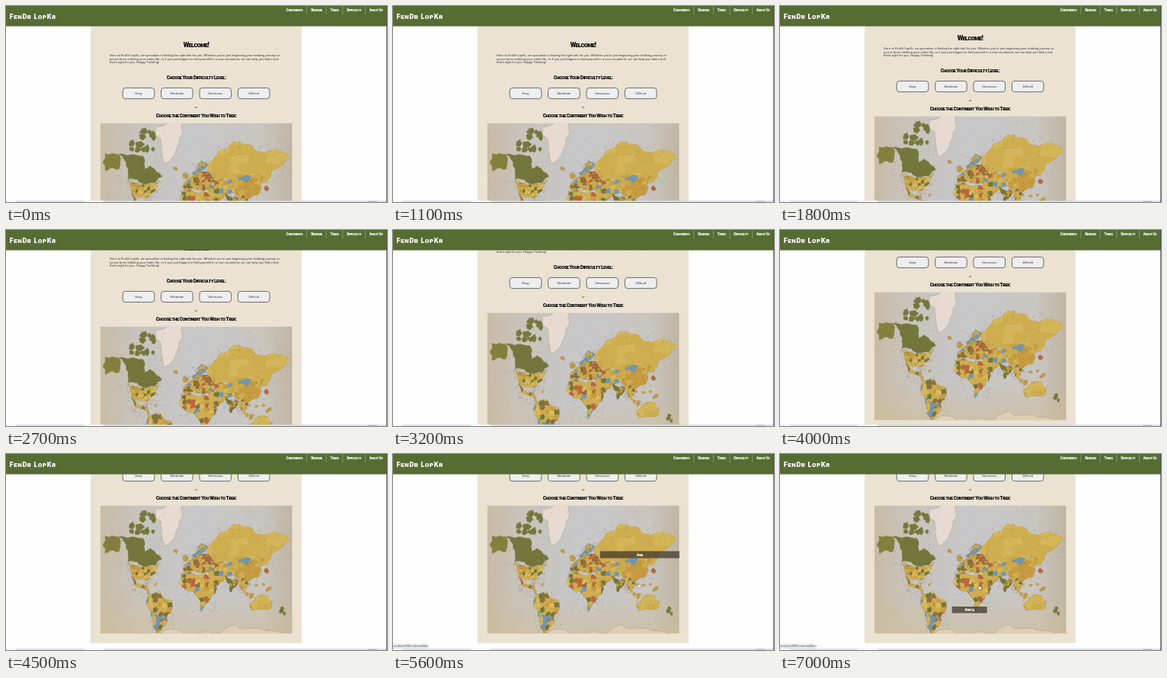
An HTML page for the animation above (7.1 s loop, 500 by 257 pixels).

```html
<!DOCTYPE html>
<html lang="en">
<head>
<meta charset="utf-8">
<style>
  html, body { margin: 0; width: 100%; height: 100%; overflow: hidden; background: #fefefe; }
  svg { display: block; width: 100vw; height: 100vh; }
  text { font: 4.16px "Liberation Sans", Arial, sans-serif; fill: #333; }
  .mid { text-anchor: middle; }
  .display { font-family: Roboto, sans-serif; font-weight: 900; font-variant: small-caps; letter-spacing: -.07em; fill: #0b0b0b; }
  .welcome { font-size: 8.6px; }
  .head { font-size: 6.4px; }
  .small { font-size: 4.6px; fill: #fff; }
  .logo { font-size: 9px; letter-spacing: .65px; fill: #fff; }
  .status { font-size: 3.35px; fill: #555; }
</style>
</head>
<body>
<svg viewBox="0 0 500 257">
  <defs>
    <linearGradient id="sea">
      <stop offset="0" stop-color="#c8bca6"/>
      <stop offset=".2" stop-color="#c8c4bd"/>
      <stop offset=".5" stop-color="#c7c7c9"/>
      <stop offset=".85" stop-color="#c9c5bf"/>
      <stop offset="1" stop-color="#bfb5a2"/>
    </linearGradient>
    <linearGradient id="fade" x2="0" y2="1">
      <stop offset=".7" stop-color="#d2bd95" stop-opacity="0"/>
      <stop offset="1" stop-color="#d2bd95" stop-opacity=".55"/>
    </linearGradient>
    <clipPath id="frame"><rect width="252" height="168"/></clipPath>
  </defs>

  <g id="page">
    <rect x="111" y="-10" width="277" height="344" fill="#ebe2d2"/>
    <text class="mid display welcome" x="249.5" y="53.5">Welcome!</text>
    <text x="136" y="65.6">Here at FenDr LopKr, we specialize in finding the right trek for you. Whether you're just beginning your trekking journey or</text>
    <text x="136" y="70.5">you've been trekking your entire life, or if you just happen to find yourself in a new countinent, we can help you find a trek</text>
    <text x="136" y="75.4">that's right for you. Happy Trekking!</text>
    <text class="mid display head" x="249.7" y="96">Choose Your Difficulty Level:</text>
    <g id="buttons"></g>
    <text class="mid" x="249.7" y="133.6">or</text>
    <text class="mid display head" x="249.7" y="146">Choose the Continent You Wish to Trek:</text>
    <g transform="translate(123.7 153.5)" clip-path="url(#frame)">
      <rect width="252" height="168" fill="url(#sea)"/>
      <rect width="252" height="168" fill="url(#fade)"/>
      <g id="map"></g>
    </g>
  </g>

  <rect width="500" height="26.6" fill="#566c33"/>
  <text class="display logo" x="4.8" y="16.8">FenDr LopKr</text>
  <g id="nav"></g>

  <g id="hover">
    <rect id="band" fill="#443c2c" fill-opacity=".76"/>
    <text id="label" class="mid display small"></text>
    <rect x="-1" y="249.3" width="47" height="5.9" rx="1" fill="#e9eaec" stroke="#ccc" stroke-width=".3"/>
    <text id="status" class="status" x=".8" y="253.4"></text>
  </g>
  <path id="cursor" d="M-1.2 -2.6q.6-.7 1.1 0v1.8l2 .5q.6.3.4 1l-.5 2h-2.6l-1.7-2.2q.2-.8 1.3-.2z"
        fill="#fff" stroke="#333" stroke-width=".35"/>

  <rect y="255.3" width="500" height="1.7" fill="#d3dce9"/>
  <path d="M0 255.3h13v1.7h-13zM102 255.3h26v1.7h-26z" fill="#f8fafc"/>
  <path d="M476 256.2h12" stroke="#777" stroke-width=".6" stroke-dasharray="2 .7"/>
  <rect x="499.2" width=".8" height="257" fill="#4a4a4a"/>
</svg>

<script>
const $ = id => document.getElementById(id);
const add = (parent, markup) => parent.insertAdjacentHTML('beforeend', markup);

let seed = 11;
const random = () => (seed = seed * 16807 % 2147483647) / 2147483647;
const between = (a, b) => a + random() * (b - a);
const pick = list => list[Math.floor(random() * list.length)];

['Easy', 'Moderate', 'Strenuous', 'Difficult'].forEach((name, i) => {
  const x = 153.2 + i * 50.4;
  add($('buttons'), `<rect x="${x}" y="107.4" width="41.6" height="14.2" rx="3.6" fill="#eeeef0" stroke="#4c4c55" stroke-width=".8"/>
    <text class="mid" x="${x + 20.8}" y="115.6">${name}</text>`);
});

// Menu items are laid out from the right, with a divider between neighbours
let edge = 494.5;
for (const name of ['About Us', 'Difficulty', 'Treks', 'Regions', 'Continents']) {
  if (edge < 494) add($('nav'), `<path d="M${edge + 5.3} 0v11" stroke="#a4b08c" stroke-width=".6"/>`);
  add($('nav'), `<text class="display small" y="7.3">${name}</text>`);
  const item = $('nav').lastElementChild;
  edge -= item.getComputedTextLength();
  item.setAttribute('x', edge);
  edge -= 10.6;
}

// Midpoint displacement turns a few corners into a ragged coast
function coast(points, depth = 3) {
  if (!depth) return 'M' + points.map(p => p.map(v => v.toFixed(1)).join(' ')).join('L') + 'z';
  return coast(points.flatMap(([x, y], i) => {
    const [u, v] = points[(i + 1) % points.length], k = between(-.16, .16);
    return [[x, y], [(x + u) / 2 + (v - y) * k, (y + v) / 2 - (u - x) * k]];
  }), depth - 1);
}

const blob = (x, y, r) => coast([0, 1, 2, 3, 4].map(i => {
  const angle = i * Math.PI * .4, d = r * between(.6, 1.2);
  return [x + d * Math.cos(angle), y + d * Math.sin(angle)];
}), 1);

function specks(count, left, top, right, bottom, length, color) {
  let d = '';
  while (count-- > 0) d += `M${between(left, right).toFixed(1)} ${between(top, bottom).toFixed(1)}h${between(.3, length).toFixed(1)}`;
  add($('map'), `<path d="${d}" stroke="${color}" stroke-width=".42" opacity=".75"/>`);
}

const olive = '#74773b', yellow = '#cfae50', gold = '#c79c42', blue = '#6f97b5', pale = '#e7dbd1';
const mixed = [yellow, yellow, gold, '#d9bd62', blue, olive, '#b9673d', '#8e7040'];
const plains = [yellow, yellow, '#d4b65a'];

// Fills an outline with country patches, then sprinkles place names around it
function land(outline, tints, names = 0, cell = 5) {
  const points = outline.split(' ').map(p => p.split(',').map(Number));
  const xs = points.map(p => p[0]), ys = points.map(p => p[1]);
  const left = Math.min(...xs), right = Math.max(...xs), top = Math.min(...ys), bottom = Math.max(...ys);
  const id = 'land' + $('map').children.length, shape = coast(points);
  let patches = '';
  if (tints.length > 1)
    for (let x = left; x <= right; x += cell)
      for (let y = top; y <= bottom; y += cell)
        patches += `<path d="${blob(x + between(-1, 1), y + between(-1, 1), cell * .75)}" fill="${pick(tints)}"/>`;
  add($('map'), `<g><clipPath id="${id}"><path d="${shape}"/></clipPath>
    <path d="${shape}" fill="${tints[0]}" stroke="#8d815e" stroke-width=".3"/>
    <g clip-path="url(#${id})">${patches}</g></g>`);
  specks(names, left - 2, top, right + 2, bottom, 1.4, '#493b29');
  specks(names / 3, left, top, right, bottom, 1.4, '#a4533a');
}

function islands(count, left, top, right, bottom, size, color) {
  let d = '';
  while (count--) d += blob(between(left, right), between(top, bottom), size * between(.5, 1.2));
  add($('map'), `<path d="${d}" fill="${color}" stroke="#8d815e" stroke-width=".2"/>`);
}

specks(80, 2, 4, 248, 160, 4, '#98948d');
land('6,40 24,41 25,60 6,62', ['#85803c'], 12);
land('24,41 56,43 58,60 66,56 81,70 60,80 36,74', [olive], 30);
islands(9, 34, 24, 74, 38, 5, olive);
islands(7, 54, 9, 74, 24, 5, olive);
land('36,74 60,80 78,75 62,98 42,93', [yellow, gold, olive, '#d9bd62'], 110, 4);
land('41,92 50,103 60,105 66,118 47,107', mixed, 70, 4);
islands(5, 60, 100, 76, 109, 1.5, gold);
land('64,116 78,113 95,127 88,144 74,168 69,150 61,128', [yellow, yellow, ...mixed], 60, 6);
land('70,142 82,146 74,167', [blue], 10);
land('71,5 108,-2 103,27 83,53 80,22', [pale], 8);
islands(2, 97, 59, 102, 62, 2.5, gold);
land('106,90 118,87 140,91 152,105 145,122 132,140 122,113 104,103', mixed, 90, 6);
land('141,86 150,74 178,72 182,90 155,105', [yellow, ...mixed], 70, 6);
land('140,54 176,24 205,37 249,45 226,62 218,78 190,72 148,75', plains, 90, 12);
land('172,74 214,70 208,93 196,99 176,92', [gold, yellow, gold], 60, 7);
land('180,73 198,70 194,80', [blue], 8);
land('108,87 122,69 142,64 150,80 130,88', mixed, 140, 4);
land('120,66 132,50 141,54 128,69', [blue, gold, blue, yellow], 30, 4);
islands(3, 111, 64, 115, 72, 3, gold);
land('163,92 183,97 171,114', [olive, olive, gold], 35, 4);
land('180,97 194,97 190,116', mixed, 50, 4);
islands(14, 186, 102, 224, 124, 3, gold);
islands(4, 212, 76, 222, 88, 2.5, '#b9673d');
land('195,130 210,117 220,118 225,134 212,136 198,137', plains, 25, 8);
islands(3, 235, 134, 242, 142, 3, olive);
land('60,170 85,163 150,168 205,161 240,170', ['#ddcfb4'], 6);

const scrollKeys = [[1500, 0], [1800, 9], [2700, 27], [3200, 45], [4000, 72], [4500, 86]];
const cursorKeys = [[4700, 444, 125], [5200, 340, 160], [5600, 323, 172], [7000, 262, 175]];
const zones = {
  Asia: { x: 271.8, y: 127.4, width: 104, height: 9.2 },
  Africa: { x: 225.7, y: 200, width: 46, height: 8.6 },
};

function sample(keys, t, column) {
  const next = keys.findIndex(key => key[0] > t);
  if (next < 0) return keys[keys.length - 1][column];
  if (!next) return keys[0][column];
  const a = keys[next - 1], b = keys[next];
  return a[column] + (b[column] - a[column]) * (t - a[0]) / (b[0] - a[0]);
}

function render(now) {
  const t = Math.floor(now % 7100 / 100) * 100;
  $('page').setAttribute('transform', `translate(0 ${-sample(scrollKeys, t, 1)})`);

  const x = sample(cursorKeys, t, 1), y = sample(cursorKeys, t, 2);
  const active = t >= 4700;
  $('cursor').setAttribute('transform', `translate(${x} ${y})`);
  $('cursor').setAttribute('visibility', active ? 'visible' : 'hidden');

  const name = x < zones.Asia.x ? 'Africa' : 'Asia', zone = zones[name];
  $('hover').setAttribute('visibility', active && x < 376 ? 'visible' : 'hidden');
  for (const key in zone) $('band').setAttribute(key, zone[key]);
  $('label').setAttribute('x', zone.x + zone.width / 2);
  $('label').setAttribute('y', zone.y + zone.height / 2 + 1.6);
  $('label').textContent = name;
  $('status').textContent = 'localhost:8080/continents/' + name;
  requestAnimationFrame(render);
}
requestAnimationFrame(render);
</script>
</body>
</html>
```
